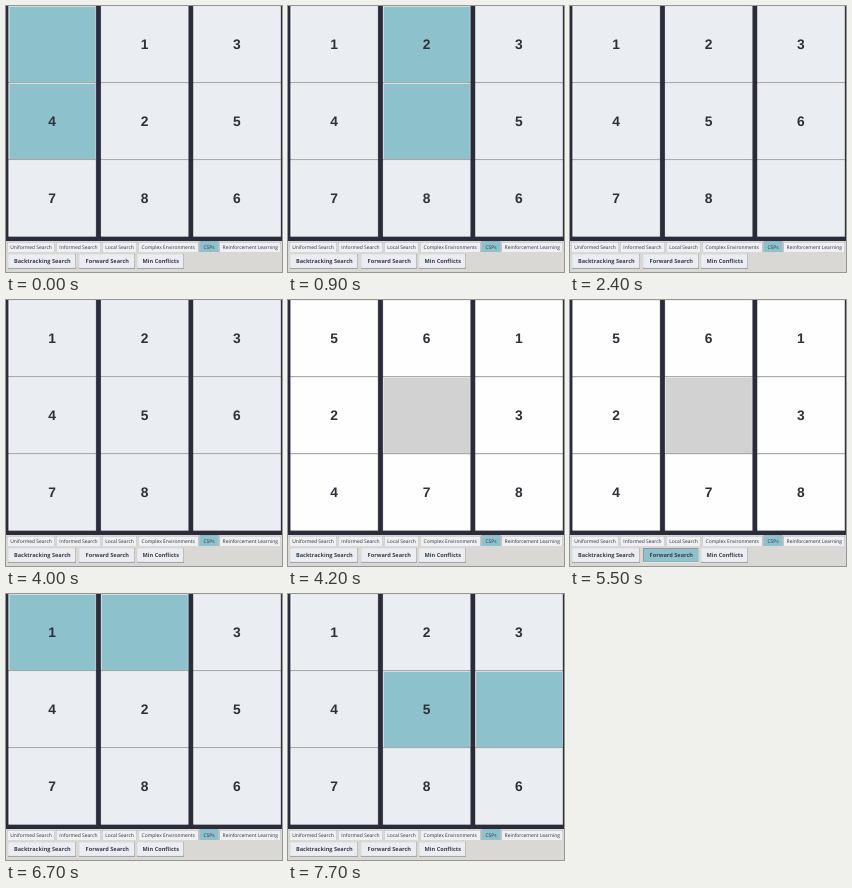
An HTML page that plays this animation: 276 px wide and 266 px high, repeating every 8 s.

```html
<!DOCTYPE html>
<html lang="en">
<head>
<meta charset="utf-8">
<title>Eight puzzle</title>
<style>
html, body { margin: 0; width: 276px; height: 266px; overflow: hidden; background: #d9d8d5; }
svg { display: block; }
text { fill: #2e3039; text-anchor: middle; text-rendering: geometricPrecision; }
.digit { font: bold 13.8px "Liberation Sans", Arial, sans-serif; }
.tab { font: 4.95px "Open Sans", sans-serif; }
.button { font: bold 5.6px "Open Sans", sans-serif; fill: #3c3e48; }
</style>
</head>
<body>
<svg id="stage" width="276" height="266" viewBox="0 0 276 266"></svg>
<script>
const NS = "http://www.w3.org/2000/svg";
const stage = document.getElementById("stage");
const LIGHT = "#eaedf2", TEAL = "#8dc1cc", WHITE = "#fefefe", GRAY = "#d2d2d2", DARK = "#2a2c3b";
const LOOP = 8000;
const EDGE = 0.42;
// Bevel layers: outer low, outer high, inner low, inner high
const RAISED = ["#696969", "#e3e3e3", "#a0a0a0", "#ffffff"];
const SUNKEN = ["#ffffff", "#a0a0a0", "#e3e3e3", "#696969"];

// start time, board, highlighted cells, scrambled look, button pressed
const steps = [
  [0,    " 13425786", [0, 3]],
  [400,  "1 3425786", [0, 1]],
  [900,  "1234 5786", [1, 4]],
  [1400, "12345 786", [4, 5]],
  [1900, "12345678 ", [5, 8]],
  [2400, "12345678 ", []],
  [4100, "5612 3478", [], true],
  [5500, "5612 3478", [], true, true],
  [5700, "413 25786", []],
  [6200, " 13425786", [0, 3]],
  [6700, "1 3425786", [0, 1]],
  [7200, "1234 5786", [1, 4]],
  [7700, "12345 786", [4, 5]]
];

function add(tag, attrs, content = "") {
  const el = document.createElementNS(NS, tag);
  for (const key in attrs) el.setAttribute(key, attrs[key]);
  el.textContent = content;
  stage.append(el);
  return el;
}

function rect(x, y, width, height, fill) {
  return add("rect", { x, y, width, height, fill });
}

function label(x, y, kind, content) {
  return add("text", { x, y, class: kind }, content);
}

function paint(layers, colors) {
  layers.forEach((layer, i) => layer.setAttribute("fill", colors[i]));
}

// Nested rectangles: each leaves one thin edge of the previous visible
function panel(x, y, w, h) {
  const layers = [];
  for (let i = 0; i < 5; i++) {
    const start = Math.floor(i / 2) * EDGE, size = i * EDGE;
    layers.push(rect(x + start, y + start, w - size, h - size));
  }
  paint(layers, [...RAISED, LIGHT]);
  return layers;
}

rect(0, 0, 276, 235, DARK);
const cells = Array.from({ length: 9 }, (_, i) => {
  const x = 2.5 + (i % 3) * 92.4, y = Math.floor(i / 3) * 77 - 0.1;
  const layers = panel(x, y, 87.8, 77);
  const digit = label(x + 43.6, y + 43.4, "digit");
  return { face: layers[4], digit };
});

rect(0, 235, 276, 31, "#d9d8d5");
const tabs = [
  [1, 49, "Uniformed Search"], [50, 95, "Informed Search"],
  [96, 131, "Local Search"], [132, 192.5, "Complex Environments"],
  [193.5, 212.5, "CSPs"], [213.5, 275, "Reinforcement Learning"]
];
for (const [left, right, name] of tabs) {
  const active = name === "CSPs";
  const top = active ? 235 : 236;
  rect(left, top, right - left, 246 - top, "#a5a6a9");
  rect(left + 0.4, top + 0.4, right - left - 0.8, 245.6 - top, active ? TEAL : "#eff0f3");
  label((left + right) / 2, 242.8, "tab", name);
}

const buttons = [[2, 70, "Backtracking Search"], [73, 129, "Forward Search"], [131, 178, "Min Conflicts"]]
  .map(([left, right, name]) => {
    const layers = panel(left, 248, right - left, 14.5);
    label((left + right) / 2 + 0.3, 257.3, "button", name);
    return layers;
  });

function show([, board, marked, scrambled, pressed]) {
  cells.forEach(({ face, digit }, i) => {
    const value = board[i].trim();
    let color = marked.includes(i) ? TEAL : LIGHT;
    if (scrambled) color = value ? WHITE : GRAY;
    face.setAttribute("fill", color);
    digit.textContent = value;
  });
  paint(buttons[1], pressed ? [...SUNKEN, TEAL] : [...RAISED, LIGHT]);
}

let current;
function tick() {
  const time = performance.now() % LOOP;
  const step = steps.findLast(([start]) => start <= time);
  if (step !== current) show(current = step);
  requestAnimationFrame(tick);
}
tick();
</script>
</body>
</html>
```
